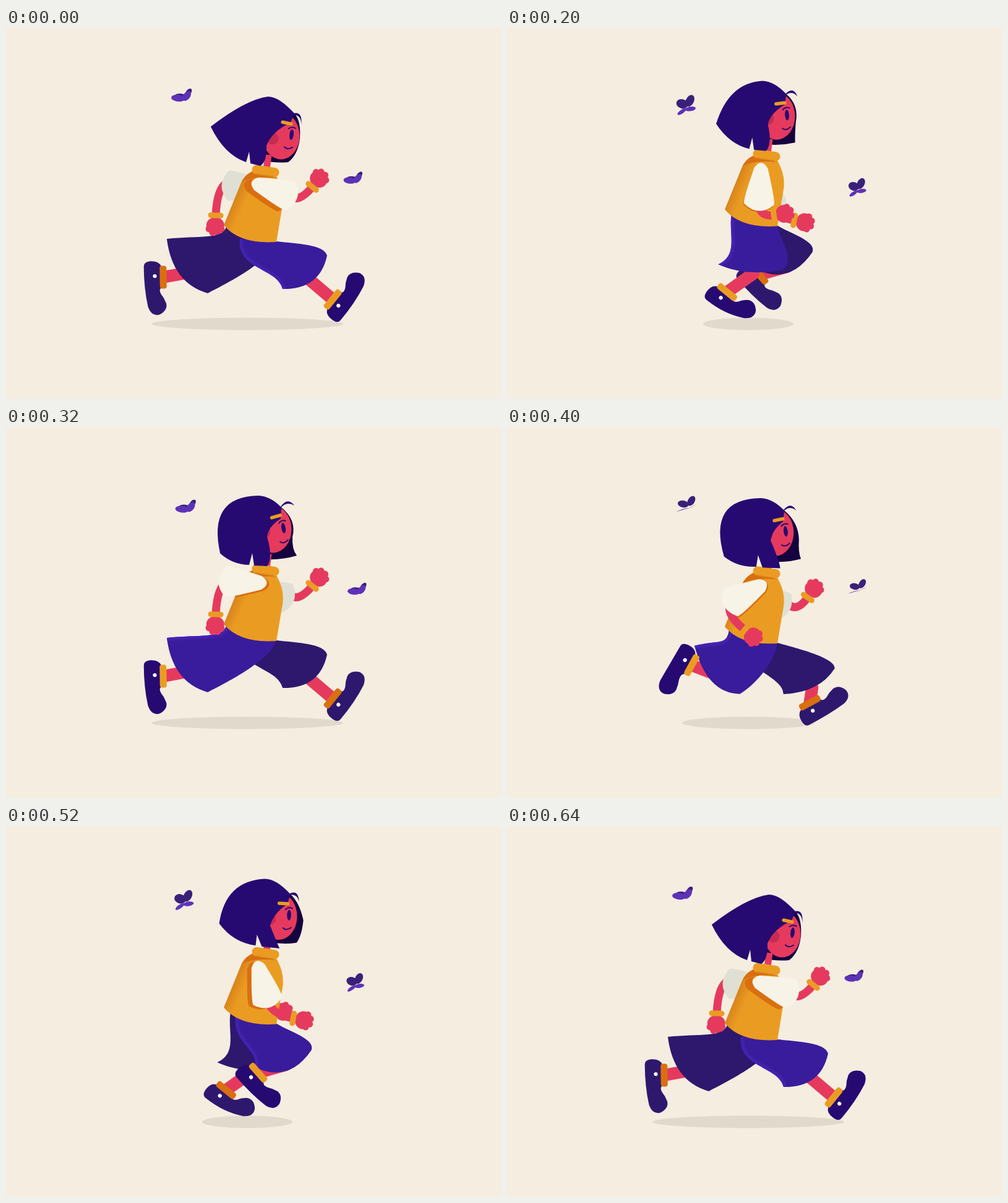
An HTML page with a canvas that plays this animation: 800 by 600 pixels, repeating every 680 ms.

```html
<!DOCTYPE html>
<html lang="en">
<head>
<meta charset="utf-8">
<title>Runner</title>
<style>
html, body { margin: 0; width: 100%; height: 100%; overflow: hidden; background: #f5ede0; }
canvas { display: block; }
</style>
</head>
<body>
<canvas id="stage" width="800" height="600"></canvas>
<script>
const ctx = document.getElementById('stage').getContext('2d');
const CYCLE = 640, LOOP = 680, STEP = 40;
const { PI, sin, cos, abs, max, min } = Math;
const C = {
  bg: '#f5ede0', shadow: '#e2d9cd', hair: '#260a72', hairBack: '#15023f', skin: '#e53a5e', cheek: '#c62c51',
  gold: '#ea9c22', rust: '#d96f10', white: '#f7f3e7', grey: '#dfe0d3',
  pants: '#391c9b', pantsEdge: '#4a24b8', pantsBack: '#2d186e', wing: '#5c33b8', wingBack: '#3b2079'
};

const rad = deg => deg * PI / 180;
const mix = (a, b, k) => a + (b - a) * k;

// Sum of harmonics: mean, then a cosine and a sine weight for each.
const wave = (a, mean, ...h) =>
  h.reduce((sum, k, i) => sum + k * (i % 2 ? sin : cos)(a * ((i >> 1) + 1)), mean);

// Body height; two bounces per stride.
const bob = a => wave(2 * a, -9.8, 1.8, 21.7, 8, .85);

// Each segment is one, two or three points: a line, quadratic or cubic.
function shape(color, start, ...segments) {
  ctx.beginPath();
  ctx.moveTo(...start);
  for (const s of segments) {
    if (s.length === 2) ctx.lineTo(...s);
    else if (s.length === 4) ctx.quadraticCurveTo(...s);
    else ctx.bezierCurveTo(...s);
  }
  ctx.closePath();
  ctx.fillStyle = color;
  ctx.fill();
}
function line(color, width, pts, cap = 'round') {
  ctx.beginPath();
  ctx.moveTo(pts[0], pts[1]);
  if (pts.length > 4) ctx.quadraticCurveTo(...pts.slice(2));
  else ctx.lineTo(pts[2], pts[3]);
  ctx.strokeStyle = color;
  ctx.lineWidth = width;
  ctx.lineCap = cap;
  ctx.stroke();
}
function oval(color, x, y, rx, ry = rx, angle = 0) {
  ctx.beginPath();
  ctx.ellipse(x, y, rx, ry, angle, 0, PI * 2);
  ctx.fillStyle = color;
  ctx.fill();
}
function at(x, y, angle, draw) {
  ctx.save();
  ctx.translate(x, y);
  ctx.rotate(angle);
  draw();
  ctx.restore();
}

function butterfly(x, y, scale, a) {
  const drift = 1 - abs(1 - a / PI);
  const open = (1 - cos(2 * a)) / 1.7;
  const lobe = (color, closed, opened) => {
    const [lx, ly, rx, ry, angle] = closed.map((v, i) => mix(v, opened[i], open));
    oval(color, lx, ly, rx, abs(ry), angle);
  };
  at(x + 6.5 * drift, y + 19.5 * drift, 0, () => {
    ctx.scale(scale, scale);
    lobe(C.wingBack, [-3, 0, 8, 3, 0], [-5, 1.5, 9.5, 7.5, .3]);
    lobe(C.wingBack, [11, -5, 7, 4, -.9], [7.5, -3.5, 10, 6.5, -1.1]);
    lobe(C.wing, [-6, 4.5, 11, 5.5, .1], [-5.4, 14, 8.5, -3, -.6]);
    lobe(C.wing, [8, 1, 9, 5.5, -.9], [8.5, 9.5, 8.5, -3.6, -.15]);
  });
}

// Shoe below the ankle; the toe curls around the ball of the foot.
function shoe(color, curl) {
  const bend = (x, y) => {
    const r = -rad(curl) * min(1, max(0, (x - 10) / 25)), dx = x - 10, dy = y - 20;
    return [10 + dx * cos(r) - dy * sin(r), 20 + dx * sin(r) + dy * cos(r)];
  };
  const curve = (x, y, x2, y2) => [...bend(x, y), ...bend(x2, y2)];
  shape(color, [-18, 3], curve(-27, 7, -26, 21), curve(-25, 31, -18, 31), curve(18, 32, 46, 33),
    curve(63, 31, 62, 17), curve(58, 3, 47, 3), curve(38, 4, 30, 7), curve(20, 9, 18, 3));
  oval('#fff', -2, 13.5, 3.1);
}

function leg(a, cloth, shoeColor, cuff, lit) {
  const c = cos(a), s = sin(a), b = bob(a);
  const hemX = wave(a, 409, 95, 10, -21, 5);
  const hemY = wave(a, 390, 5, 8, 0, 12);
  const hemAngle = rad(wave(a, 3, -45, -7, 5, 7));
  const half = 50 - 5 * c, hx = half * cos(hemAngle), hy = half * sin(hemAngle);
  const ankleX = wave(a, 388, 128, 16, 3, 6, 9, 0);
  const ankleY = min(446, wave(a, 418, 18, 26, 3, 4, 0, 8));
  const footAngle = rad(wave(a, 37, -70, -34, -18, 8));

  const front = [hemX + hx, hemY + hy], back = [hemX - hx, hemY - hy];
  const waist = [437, 345 + b], seat = [367 + 11 * c, 331 + 10 * c + b];
  const rise = [
    back[0] + 22 - 30 * c, back[1] - 20 - 14 * c,
    seat[0] - 5, seat[1] + 36 + 14 * c, ...seat
  ];
  line(C.skin, 20, [hemX + 5, hemY + 10, ankleX, ankleY]);
  shape(cloth, waist,
    [waist[0] + 12 + 22 * c, waist[1] + 18 - 14 * c, front[0] + 15 - 20 * c, front[1] - 18, ...front],
    [hemX + 24 * c, hemY + 28 - 14 * s, ...back], rise);
  if (lit) {
    ctx.save();
    ctx.clip();
    ctx.beginPath();
    ctx.moveTo(...back);
    ctx.bezierCurveTo(...rise);
    ctx.strokeStyle = C.pantsEdge;
    ctx.globalAlpha = .4;
    for (const w of [12, 8, 4]) {
      ctx.lineWidth = w;
      ctx.stroke();
    }
    ctx.restore();
  }
  at(ankleX, ankleY, footAngle, () => {
    shoe(shoeColor, max(0, wave(a, 12, 0, 9, 0, -10)));
    ctx.beginPath();
    ctx.roundRect(-18.5, -5.5, 37, 11, 4);
    ctx.fillStyle = cuff;
    ctx.fill();
  });
}

const shoulder = a => [409 - 4 * cos(a), 252 + bob(a)];
const armAngle = a => rad(wave(a, 91, -75, -15, 10, 0, -6, 0));

// Sleeve pointing along x from the shoulder.
function sleeve(a, color, dx = 0, dy = 0) {
  const [x, y] = shoulder(a);
  at(x + dx, y + dy, armAngle(a), () =>
    shape(color, [0, -11], [55, -27, 59, -24], [80, 0, 59, 24], [55, 27, 0, 11], [-17, 0, 0, -11]));
}

function arm(a, color, dx = 0, dy = 0) {
  const [x, y] = shoulder(a), r = armAngle(a);
  const along = d => [x + d * cos(r), y + d * sin(r)];
  const [ex, ey] = along(72);
  const wx = wave(a, 435, 72, 6, -18, 0, 6, 0);
  const wy = bob(a) + wave(a, 307, -23, -14, -27, -9);
  line(C.skin, 13, [...along(55), ex, ey + 8, wx, wy], 'butt');
  sleeve(a, color, dx, dy);
  at(wx, wy, Math.atan2(wy - ey - 8, wx - ex), () => {
    oval(C.skin, 16, 0, 13, 14.5);
    for (let i = 0; i < 4; i++) {
      const f = rad(-66 + 44 * i);
      oval(C.skin, 18 + 10.5 * cos(f), 11 * sin(f), 5.4);
    }
    line(C.gold, 9, [0, -8, 0, 8]);
  });
}

function torso(a) {
  const b = bob(a);
  const shade = ctx.createLinearGradient(368, 283, 384, 290);
  shade.addColorStop(0, '#da851c');
  shade.addColorStop(1, C.gold);
  at(0, b, 0, () => {
    shape(shade, [437, 240], [452, 266, 446, 292], [437, 346], [378, 350, 352, 319],
      [380, 250], [388, 234, 404, 230], [430, 234]);
    ctx.clip();
    at(0, -b, 0, () => sleeve(a, C.rust, -4 - 8 * cos(a), 2));
    shape(C.rust, [378, 250], [386, 233, 399, 232], [439, 243], [400, 238, 378, 250]);
  });
}

// The head rocks between a forward and a backward shape; loose hair follows late.
function head(a) {
  const c = cos(a), w = (1 - c) / 2, late = (1 - cos(a - .45)) / 2, swing = max(0, -sin(a));
  const pt = (x0, y0, x1, y1, push = 0, k = w) => [mix(x0, x1, k) + push * swing, mix(y0, y1, k)];
  const eyeX = 455 + 6.5 * c, eyeY = 168 + 4.5 * c, tilt = -2 + 14 * c;
  const brow = pt(466, 138, 445, 130);
  const tip = pt(456, 217, 470, 208, 10), nape = pt(410, 213, 422, 214, 14);

  shape(C.hairBack, brow,
    [...pt(477, 150, 470, 150), ...pt(475, 178, 463, 178, 10)],
    [...pt(472, 205, 462, 198, 10), ...tip],
    [mix(tip[0], nape[0], .5), mix(tip[1], nape[1], .5) + 4, ...nape]);
  line(C.skin, 11, [421, 228, 424, 205], 'butt');

  oval(C.skin, eyeX - 17, eyeY + 2, 30, 38);
  oval(C.cheek, eyeX - 31, eyeY + 6, 10);
  at(eyeX, eyeY, rad(tilt * .6), () => {
    oval(C.hair, 0, 0, 3.3, 8.5);
    line(C.hair, 2, [-6, -9, -1, -14, 5, -11]);
    line(C.hair, 2, [-9, 21, -4, 26, 4, 20]);
  });

  line(C.gold, 15, [405, 229, 434, 233.5]);
  line('#dc881b', 1.5, [404, 235.5, 416, 238, 432, 240]);

  shape(C.hair, brow,
    [...pt(440, 110, 428, 112), ...pt(423, 111, 408, 111)],
    [...pt(391, 116, 322, 112, 0, late), ...pt(330, 157, 347, 207, 6, late)],
    [...pt(352, 204, 368, 224, 8, late), ...pt(388, 217, 393, 223, 15)],
    pt(393, 200, 398, 204, 12), pt(395, 219, 401, 224, 18), pt(411, 223, 422, 225, 30),
    [...pt(422, 216, 432, 212, 14), ...pt(421, 190, 422, 178, 6)],
    [...pt(430, 167, 423, 162, 6), ...pt(460, 153, 444, 148)]);

  const [cx, cy] = pt(480, 134, 455, 112), strand = pt(477, 157, 466, 127);
  shape(C.hair, [brow[0] - 2, brow[1]], [cx, cy, ...strand], [cx - 2, cy + 7, brow[0] - 2, brow[1] + 2]);
  at(eyeX - 9.5 + tilt / 6, eyeY - 18.8, rad(tilt), () => line(C.gold, 5.5, [-7, 0, 7, 0]));
}

function draw(t) {
  const a = t / CYCLE * 2 * PI, opposite = a + PI;
  ctx.fillStyle = C.bg;
  ctx.fillRect(0, 0, 800, 600);
  oval(C.shadow, 390, 478.5, 107 + 48 * cos(2 * a), 10);
  butterfly(284, 109, 1, a);
  butterfly(561, 242.5, .92, a);
  arm(opposite, C.grey, 5 * cos(a) + 8 * sin(a), 5);
  leg(opposite, C.pantsBack, C.pantsBack, C.rust, false);
  leg(a, C.pants, C.hair, C.gold, true);
  torso(a);
  arm(a, C.white);
  at(0, bob(a), 0, () => head(a));
}

const start = performance.now();
function tick(now) {
  const ms = max(0, now - start) % LOOP;
  draw(Math.floor(ms / STEP) * STEP % CYCLE);
  requestAnimationFrame(tick);
}
draw(0);
requestAnimationFrame(tick);
</script>
</body>
</html>
```
